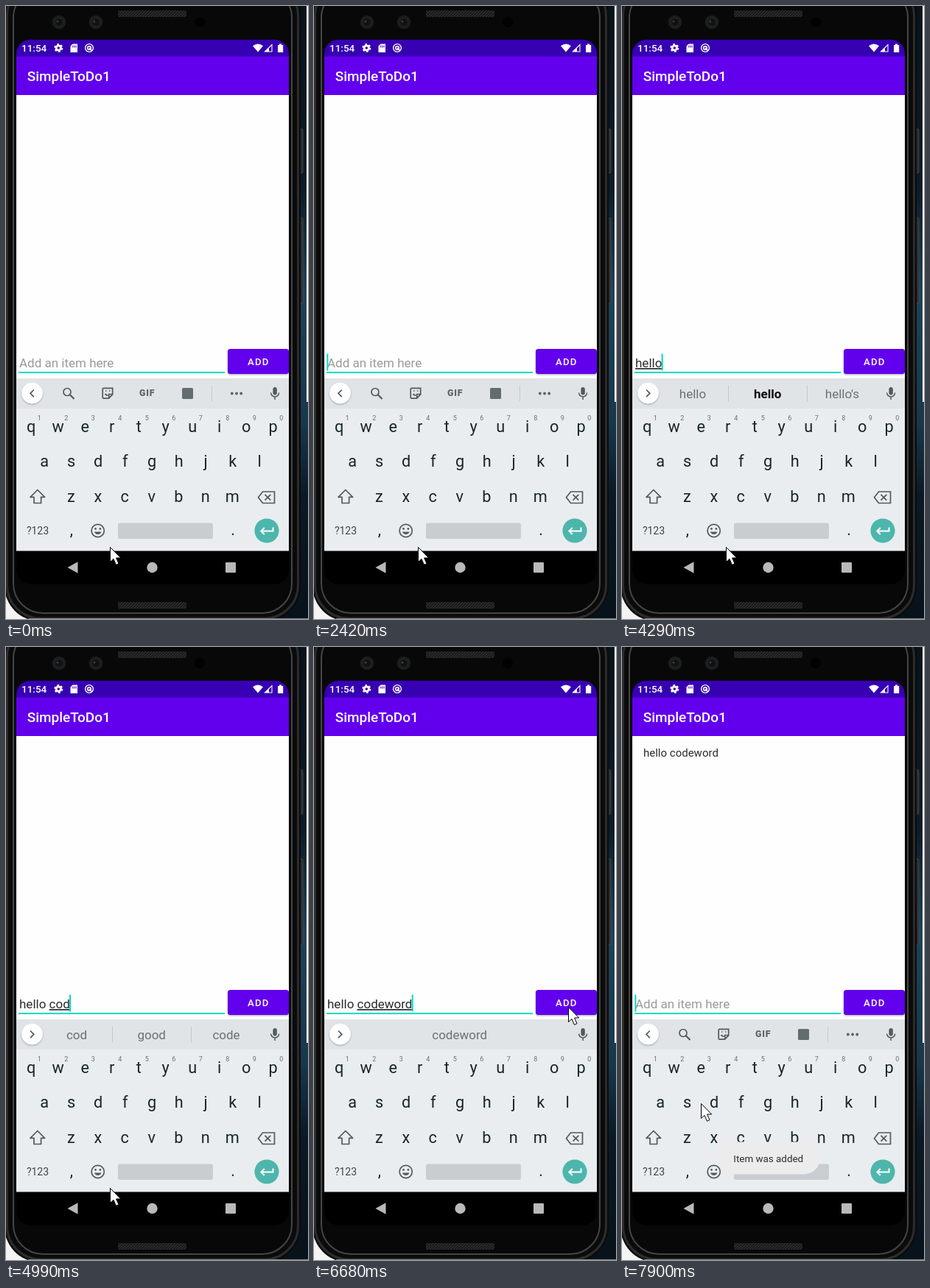
These frames come from a looping animation (410 px wide and 833 px high, 8000 ms). An HTML page:

```html
<!DOCTYPE html>
<html lang="en">
<head>
<meta charset="utf-8">
<title>To-do list demo</title>
<style>
html, body { margin: 0; width: 100%; height: 100%; overflow: hidden; background: #0a1722; }
svg { display: block; width: 410px; height: 833px; font-family: Roboto, "Open Sans", sans-serif; }
text { white-space: pre; }
.mid { text-anchor: middle; }
.line { fill: none; stroke: #505a60; stroke-width: 1.7; }
.key { font-size: 21.7px; fill: #17262d; }
.sup { font-size: 9px; fill: #667077; }
.sug { font-size: 17px; fill: #687175; }
.field { font-size: 17px; fill: #2b2b2b; }
.compose { text-decoration: underline; text-decoration-thickness: 1px; }
</style>
</head>
<body>
<svg viewBox="0 0 410 833">
  <defs>
    <linearGradient id="sky" x2="0" y2="1">
      <stop offset="0" stop-color="#08121b"/>
      <stop offset=".3" stop-color="#0b1c29"/>
      <stop offset=".47" stop-color="#1f4257"/>
      <stop offset=".68" stop-color="#18374b"/>
      <stop offset=".8" stop-color="#0a1925"/>
      <stop offset="1" stop-color="#07121b"/>
    </linearGradient>
    <pattern id="mesh" width="4" height="4" patternUnits="userSpaceOnUse">
      <rect width="4" height="4" fill="#1b1b1b"/>
      <path d="M0 4L4 0" stroke="#383838"/>
    </pattern>
    <clipPath id="screen"><rect x="14" y="45.7" width="370" height="740" rx="19"/></clipPath>
    <filter id="soft" x="-30%" y="-30%" width="160%" height="170%">
      <feDropShadow dx="0" dy="1.2" stdDeviation="1.2" flood-opacity=".3"/>
    </filter>
  </defs>

  <rect width="410" height="833" fill="url(#sky)"/>
  <rect y="780" width="60" height="53" fill="#f4f4f4"/>
  <rect x="408" width="2" height="538" fill="#f2f2f2"/>
  <g fill="#2b2d2f" stroke="#55585a" stroke-width=".7">
    <rect x="398" y="167" width="5" height="60" rx="1.5"/>
    <rect x="398" y="288" width="5" height="116" rx="1.5"/>
  </g>
  <rect x="-2" y="-36" width="402" height="872" rx="48" fill="#0b0b0b"/>
  <rect x="1.5" y="-32" width="395" height="864" rx="45" fill="none" stroke="#2c2c2c" stroke-width="3"/>
  <rect x="10" y="-24" width="378" height="849" rx="40" fill="#080808" stroke="#454545" stroke-width="2"/>
  <path d="M30 832.5H410" stroke="#8a8a8a"/>
  <rect x="152" y="6" width="93" height="9" rx="2" fill="url(#mesh)"/>
  <rect x="152" y="810" width="93" height="9" rx="2" fill="url(#mesh)"/>
  <g id="cams"></g>
  <circle cx="263" cy="22" r="7" fill="#020202"/>

  <g clip-path="url(#screen)">
    <rect x="14" y="45" width="370" height="741" fill="#000"/>
    <rect x="14" y="121" width="370" height="386" fill="#fefefe"/>
    <rect x="14" y="45" width="370" height="24" fill="#3700b3"/>
    <rect x="14" y="68.5" width="370" height="52.5" fill="#6200ee"/>

    <g fill="#fff">
      <text x="21" y="62" font-size="13.5" font-weight="500">11:54</text>
      <g id="gear" transform="translate(71.3 57)">
        <circle r="3.2" fill="none" stroke="#fff" stroke-width="2.8"/>
        <circle r="5" fill="none" stroke="#fff" stroke-width="2" stroke-dasharray="2.62 2.62"/>
      </g>
      <g id="tray">
        <path d="M90.5 51.5H97V63H87.5V54.5Z"/>
        <path d="M90.8 53.5v3M93 53.5v3M95.2 53.5v3" stroke="#3700b3"/>
        <circle cx="113" cy="57" r="5.4" fill="none" stroke="#fff" stroke-width="1.4"/>
        <circle cx="113" cy="57" r="2.3" fill="none" stroke="#fff" stroke-width="1.6"/>
        <path d="M113 57L117 61" stroke="#fff" stroke-width="1.6"/>
      </g>
      <path d="M335 54.2Q342 49 349 54.2L342 62.5Z"/>
      <path d="M351.5 62L361 52.5V62Z" fill="none" stroke="#fff" stroke-width="1.1"/>
      <path d="M351.5 62L357 56.5V62Z"/>
      <path d="M369 53h2v-1.5h3V53h2.2V63H369Z"/>
      <text x="28.7" y="102" font-size="19" font-weight="500">SimpleToDo1</text>
    </g>

    <text id="item" x="29" y="149.3" font-size="15" fill="#2b2b2b">hello codeword</text>

    <rect x="17" y="497" width="280" height="2" fill="#03dac5"/>
    <text id="hint" class="field" x="18" y="491" style="fill:#9a9a9a">Add an item here</text>
    <text id="typed" class="field" x="18" y="491"><tspan id="done"></tspan><tspan id="word" class="compose"></tspan></text>
    <rect id="caret" y="472.5" width="2" height="23" fill="#03dac5"/>
    <rect id="add" x="301" y="466" width="83" height="34" rx="3.5" fill="#6200ee" filter="url(#soft)"/>
    <text class="mid" x="342.8" y="488.3" font-size="13.2" font-weight="500" letter-spacing="1.2" fill="#fff">ADD</text>

    <rect x="14" y="506" width="370" height="42" fill="#e0e4e7"/>
    <rect x="14" y="547" width="370" height="193.5" fill="#e9edf0"/>
    <circle cx="35.5" cy="526" r="14.3" fill="#fff" filter="url(#soft)"/>
    <path id="chevron" class="line"/>

    <g id="tools">
      <circle class="line" cx="83" cy="524.5" r="5"/>
      <path class="line" d="M86.8 528.3l5.7 5.7" style="stroke-width:2.2"/>
      <path class="line" d="M132.5 519.3h12.2v8.5l-5.2 5.4h-7q-1.3 0-1.3-1.3v-11.3q0-1.3 1.3-1.3zM144.7 527.5h-5v5.5M134.5 527q1.5 2.5 4 1.6M135 523h1.4M140 523h1.4"/>
      <text class="mid" x="191.7" y="530.4" font-size="12.3" font-weight="900" letter-spacing=".8" fill="#5b656a">GIF</text>
      <rect x="239" y="519" width="15" height="15" rx="1.5" fill="#626c71"/>
      <path d="M279.5 516v21" stroke="#c5cacd"/>
      <g fill="#596267"><circle cx="306.8" cy="526.5" r="1.9"/><circle cx="313" cy="526.5" r="1.9"/><circle cx="319.2" cy="526.5" r="1.9"/></g>
    </g>
    <g id="strip">
      <path id="bars" d="M144.5 515.5v22M251.5 515.5v22" stroke="#c3c9cc"/>
      <text class="sug mid" x="96" y="533"></text>
      <text class="sug mid" x="197.7" y="533"></text>
      <text class="sug mid" x="299" y="533"></text>
    </g>
    <rect x="362.4" y="518" width="5.4" height="10.5" rx="2.7" fill="#505a60"/>
    <path class="line" d="M359.6 525.5a5.5 5.5 0 0 0 11 0M365.1 531v4" style="stroke-width:1.5"/>

    <g id="keys"></g>
    <path class="line" d="M42.8 657.5L33 667.3h5v8.2h9.6v-8.2h5z" stroke-linejoin="round"/>
    <path class="line" d="M348.5 660H364.5V675.5H348.5L342.5 667.7ZM351.5 663.8l7.8 7.8M359.3 663.8l-7.8 7.8"/>
    <text class="mid" x="43" y="718" font-size="14" fill="#3b474d">?123</text>
    <text class="key mid" x="89" y="718.5">,</text>
    <text class="key mid" x="308" y="718.5">.</text>
    <circle class="line" cx="124.7" cy="713" r="8.6"/>
    <g fill="#505a60">
      <circle cx="121.5" cy="710.4" r="1.4"/>
      <circle cx="127.9" cy="710.4" r="1.4"/>
      <path d="M119.9 714.6H129.5A5.1 5.1 0 0 1 119.9 714.6Z"/>
    </g>
    <rect x="152" y="702.5" width="129" height="21.5" rx="2.5" fill="#c8cdd1"/>
    <circle cx="354" cy="713" r="16.6" fill="#4db6ac"/>
    <path d="M362.5 708.5v5H346.5M350.8 709l-4.5 4.5 4.5 4.5" fill="none" stroke="#fff" stroke-width="2"/>

    <g id="toast">
      <rect x="129.5" y="672.5" width="139.5" height="44" rx="22" fill="#ececed"/>
      <text class="mid" x="198.7" y="700" font-size="13.4" fill="#2a2d2f">Item was added</text>
    </g>

    <g fill="#b9b9b9">
      <path d="M83.5 763L97.5 755.3V770.7Z"/>
      <circle cx="198.5" cy="763" r="7.2"/>
      <rect x="298" y="756" width="14" height="14" rx="1"/>
    </g>
  </g>
  <path id="mouse" d="M.5 .5V20.5L5 16.4L8.4 24.3L12 22.7L8.6 15H14.7Z" fill="#fff" stroke="#000"/>
</svg>

<script>
const $ = id => document.getElementById(id);
const LOOP = 8000;

function add(parent, tag, attrs, text = "") {
  const el = document.createElementNS("http://www.w3.org/2000/svg", tag);
  for (const k in attrs) el.setAttribute(k, attrs[k]);
  el.textContent = text;
  $(parent).append(el);
}

for (const cx of [72, 122]) {
  add("cams", "circle", { cx, cy: 22, r: 9.3, fill: "#1c1d1e" });
  add("cams", "circle", { cx, cy: 22, r: 5.5, fill: "#101112", stroke: "#242628" });
  add("cams", "circle", { cx: cx - 2, cy: 21, r: 1.6, fill: "#393b3d" });
}

[["qwertyuiop", 34.2, 579], ["asdfghjkl", 52.2, 626], ["zxcvbnm", 88.3, 673.5]].forEach(([row, x0, y], r) => {
  [...row].forEach((ch, i) => {
    const x = x0 + i * 36.5;
    add("keys", "text", { x, y, class: "key mid" }, ch);
    if (!r) add("keys", "text", { x: x + 11, y: 563, class: "sup mid" }, (i + 1) % 10);
  });
});

// Each step overrides part of the state from its time on.
const steps = [
  [0, { done: "", word: "", sug: null, bold: false, caret: 0, gear: 1, mouse: [141, 735], press: 0, item: 0, toast: 0 }],
  [640, { caret: 1 }],
  [880, { caret: 0 }],
  [2420, { caret: 1 }],
  [3020, { sug: ["h", "hello", "hi"], bold: true }],
  [3460, { word: "h" }],
  [3590, { gear: 0 }],
  [3740, { word: "he" }],
  [4020, { word: "hel", sug: ["hel", "hello", "held"] }],
  [4160, { word: "hell", sug: ["hell", "hello", "help"], gear: 1 }],
  [4290, { word: "hello", sug: ["hello", "hello", "hello's"] }],
  [4420, { done: "hello ", word: "", sug: ["I", "and", "there"], bold: false }],
  [4700, { word: "c", sug: ["c", "can", "come"] }],
  [4850, { word: "co", sug: ["co", "come", "could"] }],
  [4990, { word: "cod", sug: ["cod", "good", "code"] }],
  [5120, { word: "codew", sug: ["codew", "codeword", "codewords"] }],
  [5270, { word: "codewo", sug: ["codewo", "codeword", "coders"] }],
  [5550, { word: "codeword", sug: ["", "codeword", ""] }],
  [5980, { caret: 0 }],
  [6260, { mouse: [321, 591] }],
  [6410, { mouse: [360, 520], caret: 1 }],
  [6540, { mouse: [351, 482] }],
  [6680, { mouse: [345, 489] }],
  [6960, { done: "", word: "", press: 1 }],
  [7090, { mouse: [230, 540] }],
  [7240, { mouse: [150, 606], press: 0, item: .4, toast: .4 }],
  [7380, { mouse: [107, 620], item: .8, toast: .9 }],
  [7500, { sug: null, item: 1, toast: 1 }],
  [7620, { caret: 0 }],
  [7900, { caret: 1 }]
];

const show = (id, on) => $(id).setAttribute("opacity", Number(on));
const labels = document.querySelectorAll(".sug");
let shown = -1;

function draw(n) {
  const s = Object.assign({}, ...steps.slice(0, n + 1).map(p => p[1]));
  $("done").textContent = s.done;
  $("word").textContent = s.word;
  const empty = !(s.done + s.word);
  show("hint", empty);
  show("caret", s.caret);
  $("caret").setAttribute("x", 17.3 + (empty ? 0 : $("typed").getComputedTextLength()));

  show("tools", !s.sug);
  show("strip", !!s.sug);
  if (s.sug) {
    show("bars", s.sug[0] !== "");
    labels.forEach((el, i) => { el.textContent = s.sug[i]; });
  }
  labels[1].style.fontWeight = s.bold ? 700 : 400;
  labels[1].style.fill = s.bold ? "#0b0d0e" : "";
  $("chevron").setAttribute("d", s.sug ? "M33 521.5l4.8 4.8-4.8 4.8" : "M37.8 521.5l-4.8 4.8 4.8 4.8");

  show("gear", s.gear);
  $("tray").setAttribute("transform", `translate(${s.gear ? 0 : -21} 0)`);
  $("mouse").setAttribute("transform", `translate(${s.mouse})`);
  $("add").setAttribute("fill", s.press ? "#6f18ef" : "#6200ee");
  show("item", s.item);
  show("toast", s.toast);
}

const start = performance.now();
function tick() {
  const t = (performance.now() - start) % LOOP;
  const n = steps.findLastIndex(p => p[0] <= t);
  if (n !== shown) draw(shown = n);
  requestAnimationFrame(tick);
}
tick();
</script>
</body>
</html>
```
